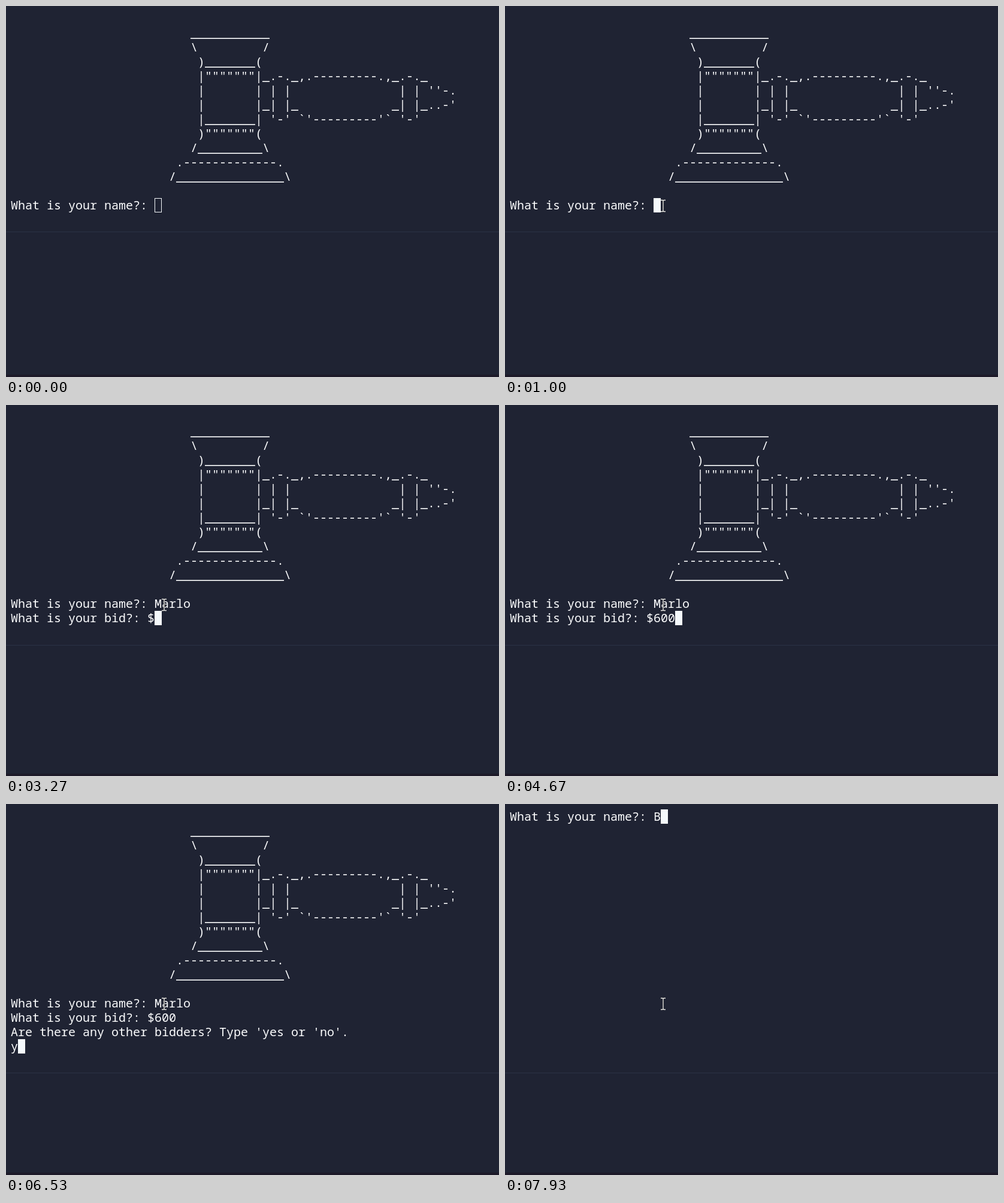
Animation, 823 px wide and 620 px high, one loop 8000 ms. Source, as an HTML page:

```html
<!DOCTYPE html>
<html lang="en">
<head>
<meta charset="utf-8">
<title>Bidding terminal</title>
<style>
  html, body { margin: 0; width: 100%; height: 100%; overflow: hidden; background: #1f2333; }
  #stage { position: relative; width: 823px; height: 620px; overflow: hidden; }
  #stage > * { position: absolute; }
  #text {
    left: 8px; margin: 0; color: #fcfdfe; white-space: pre;
    font: 20px/24px "Noto Sans Mono", "DejaVu Sans Mono", monospace;
    font-variant-ligatures: none;
  }
  #caret { width: 12px; height: 24px; box-sizing: border-box; border: 1px solid #f5f9fc; }
  #caret.on { background: #f5f9fc; }
  #rule { left: 0; width: 100%; height: 1px; background: #2b3245; }
  #foot { left: 0; top: 616px; width: 100%; height: 4px; background: #1d1a29; }
  #mouse { left: 0; top: 0; width: 10px; height: 22px; fill: none; }
</style>
</head>
<body>
<div id="stage">
  <div id="rule"></div>
  <div id="foot"></div>
  <pre id="text"></pre>
  <div id="caret"></div>
  <svg id="mouse" viewBox="-5 -11 10 22">
    <path d="M-4-9.5h3l1 1l1-1h3M0-8.5v17M-4 9.5h3l1-1l1 1h3" stroke="#14161f" stroke-width="2.4"/>
    <path d="M-4-9.5h3l1 1l1-1h3M0-8.5v17M-4 9.5h3l1-1l1 1h3" stroke="#f4f4f0" stroke-width="1.3"/>
  </svg>
</div>
<script>
const LOOP = 8000, CELL = 12, ROW = 24, LEFT = 8;
const $ = id => document.getElementById(id);
const text = $('text'), caret = $('caret'), rule = $('rule'), mouse = $('mouse');

const gavel = String.raw`
                         ___________
                         \         /
                          )_______(
                          |"""""""|_.-._,.---------.,_.-._
                          |       | | |               | | ''-.
                          |       |_| |_             _| |_..-'
                          |_______| '-' ${'`'}'---------'${'`'} '-'
                          )"""""""(
                         /_________\
                       .-------------.
                      /_______________\

`;
const ask = 'What is your name?: ';
const name = gavel + ask + 'Marlo';
const bid = name + '\nWhat is your bid?: $';
const more = bid + "600\nAre there any other bidders? Type 'yes or 'no'.\n";

// start time, screen text, top of first row, y of the rule
const steps = [
  [0, gavel + ask, 9, 377],
  [2870, name, 9, 377],
  [3200, bid, 9, 377],
  [3270, bid, 8, 401],
  [4530, bid + '6', 8, 401],
  [4600, bid + '60', 8, 401],
  [4670, bid + '600', 8, 401],
  [5200, more, 9, 425],
  [6530, more + 'y', 9, 449],
  [6600, more + 'ye', 9, 449],
  [6730, more + 'yes', 9, 449],
  [6930, ask, 9, 449],
  [7930, ask + 'B', 9, 449]
];

// pointer sweeps in from the corner, rises past the prompt and settles
function pointer(t) {
  const p = Math.min(1, (Math.floor((t - 70) / 66) + 1) / 11);
  const q = 1 - p;
  return [
    264 + 556 * q ** 2,
    334 + 350 * q ** 2 - 170 * p * q
  ];
}

let shown;
function draw(t) {
  const step = steps.findLast(s => s[0] <= t);
  if (step !== shown) {
    shown = step;
    const [, str, top, line] = step;
    const rows = str.split('\n');
    text.textContent = str;
    text.style.top = top + 'px';
    caret.style.left = LEFT + CELL * rows.at(-1).length + 'px';
    caret.style.top = top + ROW * (rows.length - 1) + 'px';
    rule.style.top = line + 'px';
  }
  caret.className = t < 1000 ? '' : 'on';
  mouse.style.visibility = t < 70 ? 'hidden' : 'visible';
  const [x, y] = pointer(Math.max(70, t));
  mouse.style.transform = `translate(${Math.round(x) - 5}px, ${Math.round(y) - 11}px)`;
}

const start = performance.now();
function tick() {
  draw((performance.now() - start) % LOOP);
  requestAnimationFrame(tick);
}
draw(0);
requestAnimationFrame(tick);
</script>
</body>
</html>
```
